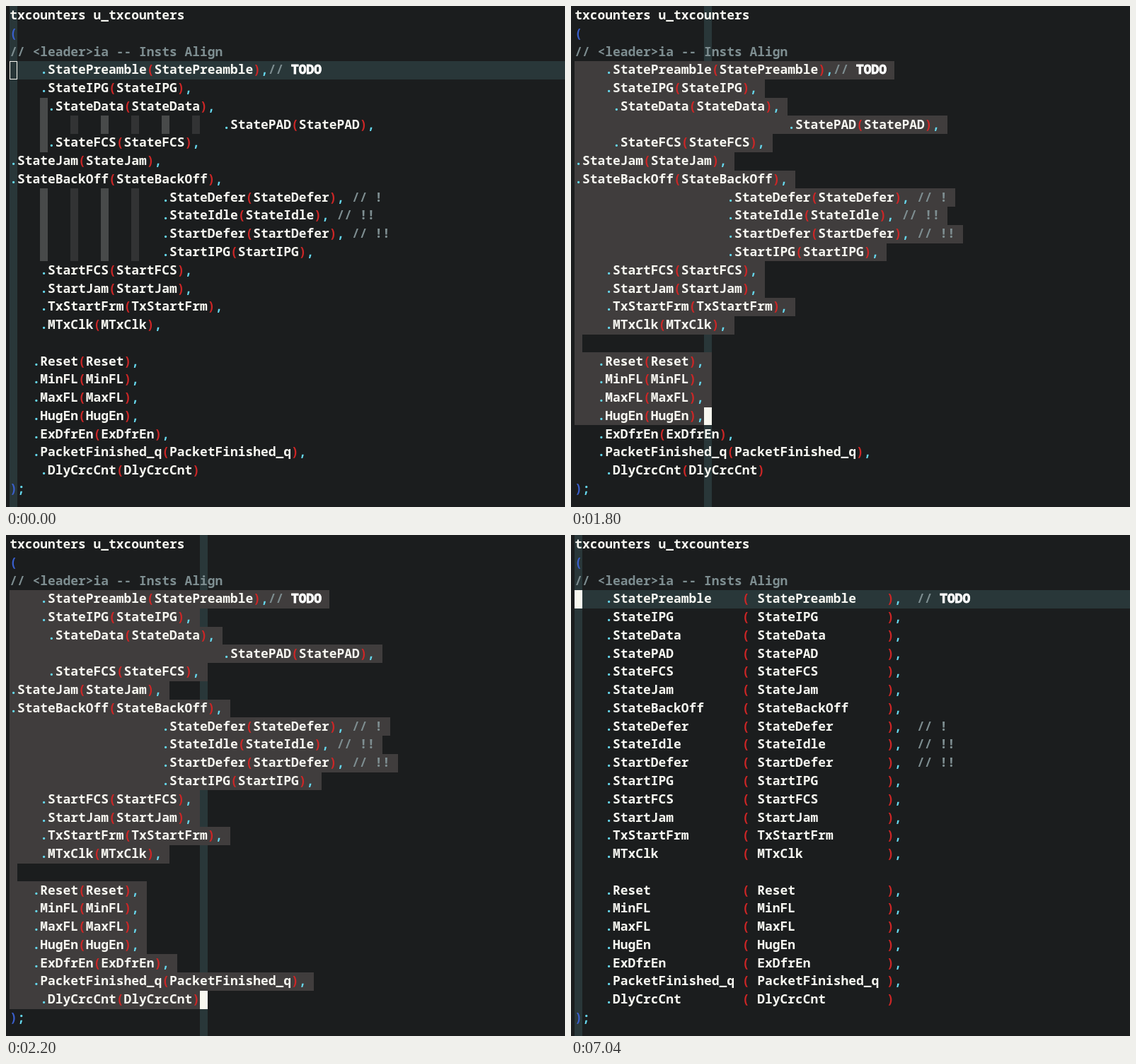
These frames come from a looping animation (790x709 px, 8400 ms). An HTML page:

```html
<!DOCTYPE html>
<html lang="en">
<head>
<meta charset="utf-8">
<title>Instance align</title>
<style>
  html, body { margin: 0; width: 100%; height: 100%; overflow: hidden; background: #1b1d1e; }
  svg { display: block; }
  text {
    font: 600 17.92px "Noto Sans Mono", "DejaVu Sans Mono", monospace;
    font-variant-ligatures: none;
    white-space: pre;
    fill: #f8f8f2;
  }
  .punct { fill: #66d9ef; }
  .paren { fill: #cd2626; }
  .outer { fill: #3a5fcd; }
  .note { fill: #7e8e91; }
  .todo { fill: #fff; stroke: #fff; stroke-width: 0.9px; }
</style>
</head>
<body>
<svg id="stage" width="790" height="709" viewBox="0 0 790 709"></svg>
<script>
const stage = document.getElementById('stage');
const LOOP = 8400, FIRST = 3;
const colX = c => 5.3 + c * 10.75;
const rowY = r => 0.7 + r * 25.77;

// indent, port name, gap before comment, comment
const ports = [
  [4, 'StatePreamble', '', '// TODO'],
  [4, 'StateIPG'],
  [5, 'StateData'],
  [28, 'StatePAD'],
  [5, 'StateFCS'],
  [0, 'StateJam'],
  [0, 'StateBackOff'],
  [20, 'StateDefer', ' ', '// !'],
  [20, 'StateIdle', ' ', '// !!'],
  [20, 'StartDefer', ' ', '// !!'],
  [20, 'StartIPG'],
  [4, 'StartFCS'],
  [4, 'StartJam'],
  [4, 'TxStartFrm'],
  [4, 'MTxClk'],
  null,
  [3, 'Reset'],
  [3, 'MinFL'],
  [3, 'MaxFL'],
  [3, 'HugEn'],
  [3, 'ExDfrEn'],
  [3, 'PacketFinished_q'],
  [4, 'DlyCrcCnt']
];

const comma = i => i < ports.length - 1 ? ',' : '';

function rawLine(port, i) {
  if (!port) return '';
  const [indent, name, gap = '', note = ''] = port;
  return ' '.repeat(indent) + `.${name}(${name})` + comma(i) + gap + note;
}

function alignedLine(port, i) {
  if (!port) return '';
  const [, name, , note] = port;
  const wide = name.padEnd(16);
  return `    .${wide} ( ${wide} )` + comma(i) + (note ? '  ' + note : '');
}

const wrap = lines => [
  'txcounters u_txcounters', '(', '// <leader>ia -- Insts Align', ...lines, ');'
];
const rawLines = wrap(ports.map(rawLine));
const alignedLines = wrap(ports.map(alignedLine));

function add(parent, tag, attrs = {}) {
  const el = document.createElementNS('http://www.w3.org/2000/svg', tag);
  for (const key in attrs) el.setAttribute(key, attrs[key]);
  return parent.appendChild(el);
}

// Rectangle in pixels, snapped so that cells meet without seams
function box(parent, x1, y1, x2, y2, fill) {
  const x = Math.round(x1), y = Math.round(y1);
  return add(parent, 'rect', {
    x, y, width: Math.round(x2) - x, height: Math.round(y2) - y, fill
  });
}

const cells = (parent, row, from, to, fill) =>
  box(parent, colX(from), rowY(row), colX(to), rowY(row + 1), fill);

function tokenClass(token, row, last) {
  if (token === 'TODO') return 'todo';
  if (token.startsWith('//')) return 'note';
  if ('()'.includes(token)) return row === 1 || row === last ? 'outer' : 'paren';
  return '.,;'.includes(token) ? 'punct' : '';
}

function drawText(lines) {
  const group = add(stage, 'g');
  lines.forEach((line, row) => {
    for (const m of line.matchAll(/TODO|\/\/(?: TODO)?.*|[().,;]|\w+(?: \w+)*/g)) {
      const parts = m[0] === '// TODO' ? [['//', 0], ['TODO', 3]] : [[m[0], 0]];
      for (const [token, shift] of parts) {
        add(group, 'text', {
          x: colX(m.index + shift),
          y: rowY(row) + 18.3,
          class: tokenClass(token, row, lines.length - 1)
        }).textContent = token;
      }
    }
  });
  return group;
}

const back = add(stage, 'g');
const rawText = drawText(rawLines);
const alignedText = drawText(alignedLines);
const front = add(stage, 'g');

function drawGuides() {
  ports.forEach((port, i) => {
    for (let c = 4; port && c < port[0]; c += 4) {
      cells(back, FIRST + i, c, c + 1, c % 8 ? '#484a4a' : '#323334');
    }
  });
}

const steps = [
  { at: 0, row: FIRST, hollow: true },
  { at: 800, row: FIRST },
  { at: 1800, row: 22, visual: true },
  { at: 2000, row: 24, visual: true },
  { at: 2200, row: 25, visual: true },
  { at: 5000, row: FIRST, aligned: true }
];

function draw({ row, hollow, visual, aligned }) {
  back.replaceChildren();
  front.replaceChildren();
  const col = visual ? rawLines[row].length : 0;
  box(back, colX(col), 0, colX(col + 1), 709, '#293739');
  if (visual) {
    for (let r = FIRST; r <= row; r++) {
      cells(back, r, 0, rawLines[r].length + 1, '#403d3d');
    }
  } else {
    box(back, colX(0), rowY(row), 790, rowY(row + 1), '#293739');
    if (!aligned) drawGuides();
  }
  const cursor = cells(front, row, col, col + 1, '#f8f8f0');
  if (hollow) {
    const x = Math.round(colX(col)), y = Math.round(rowY(row));
    cursor.remove();
    add(front, 'rect', {
      x: x + 0.5, y: y + 0.5, width: 10, height: 25, fill: 'none', stroke: '#f8f8f0'
    });
  }
  rawText.style.display = aligned ? 'none' : '';
  alignedText.style.display = aligned ? '' : 'none';
}

let shown = null;
function render(ms) {
  const step = steps.findLast(s => s.at <= ms % LOOP);
  if (step !== shown) draw(shown = step);
}

const start = performance.now();
function tick() {
  render(performance.now() - start);
  requestAnimationFrame(tick);
}
tick();
</script>
</body>
</html>
```
